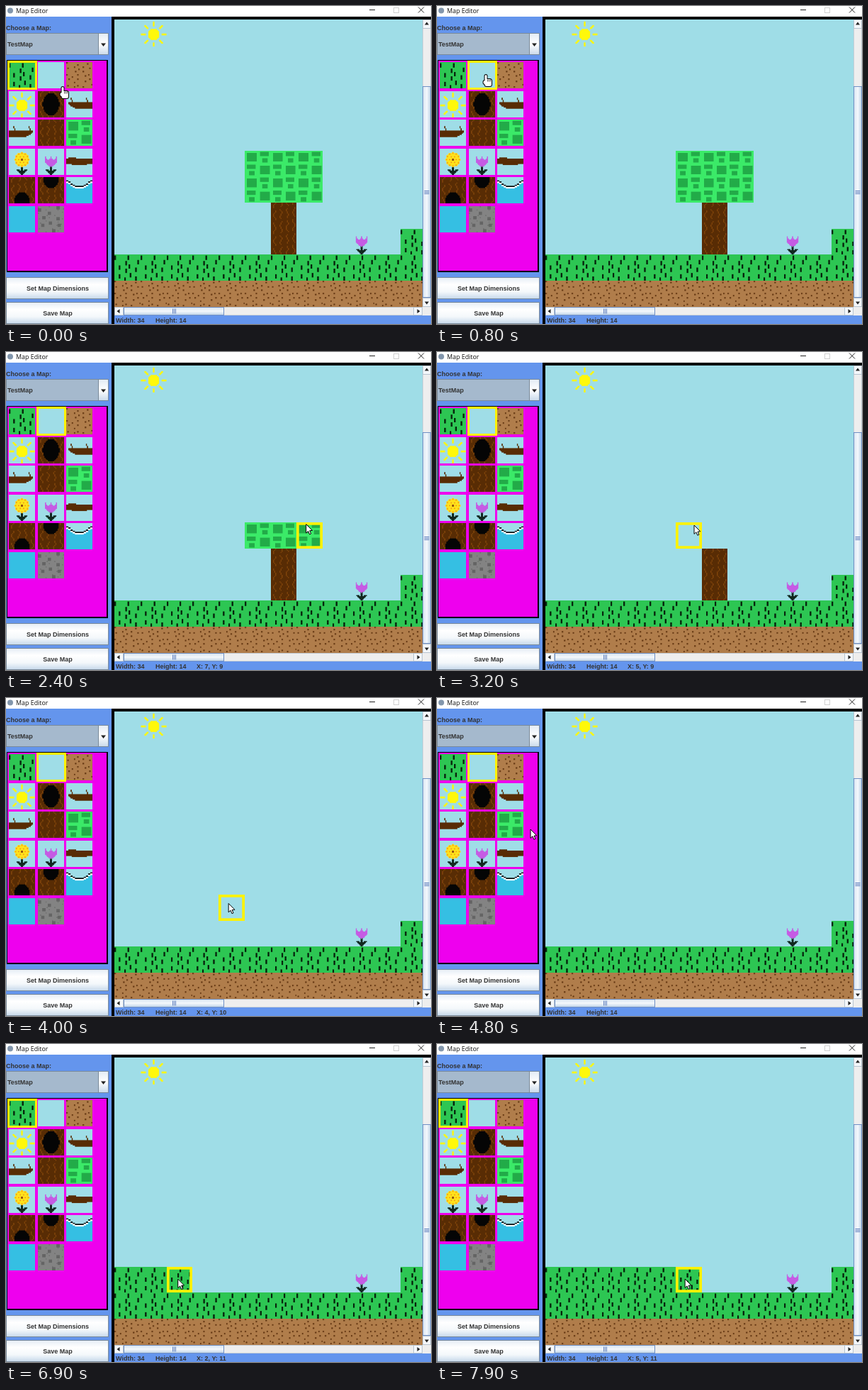
Write an HTML page with a canvas that moves like this. It is 600 px wide and 448 px high and loops after 8000 ms.

```html
<!DOCTYPE html>
<html lang="en">
<head>
<meta charset="utf-8">
<title>Map Editor</title>
<style>
  html, body { margin: 0; width: 100%; height: 100%; overflow: hidden; background: #6495ed; }
  canvas { display: block; width: 600px; height: 448px; }
</style>
</head>
<body>
<canvas id="stage" width="600" height="448"></canvas>
<script>
const ctx = document.getElementById('stage').getContext('2d');
const LOOP = 8000, STEP = 100;
const CELL = 36.7, MAP_X = 153.8, MAP_Y = -89.5;
const VIEW = { x: 153, y: 19, w: 435, h: 405 };
const SKY = '#9fdde7', BLUE = '#6495ed', YELLOW = '#fff200', EDGE = '#7a8a99';
const BARK = '#582c04', WATER = '#35bfe3', BLACK = '#050505', STEM = '#10281f';
const UI_BOLD = 'bold 9px "Liberation Sans", Arial, sans-serif';

// ---------- Tiles, drawn on a 24 x 24 grid ----------
function makeTile(base, paint) {
  const c = document.createElement('canvas');
  c.width = c.height = 48;
  const g = c.getContext('2d');
  g.scale(2, 2);
  const put = (color, x, y, w = 1, h = 1) => {
    g.fillStyle = color;
    g.fillRect(x, y, w, h);
  };
  put(base, 0, 0, 24, 24);
  if (paint) paint(put);
  return c;
}

function disc(put, color, cx, cy, rx, ry = rx) {
  for (let y = 0; y < 24; y++) {
    const k = 1 - ((y + .5 - cy) / ry) ** 2;
    if (k <= 0) continue;
    const half = Math.round(rx * Math.sqrt(k));
    put(color, cx - half, y, half * 2, 1);
  }
}

function ring(put, color, cx, cy, radius, count, size = 1) {
  for (let i = 0; i < count; i++) {
    const a = i / count * Math.PI * 2;
    put(color, cx + Math.cos(a) * radius - size / 2, cy + Math.sin(a) * radius - size / 2, size, size);
  }
}

function seeded(seed) {
  return () => (seed = (seed * 16807) % 2147483647) / 2147483647;
}

// One speck in each square of a grid, shifted at random; odd columns sit lower.
function specks(put, color, cols, rows, w, h, seed) {
  const rnd = seeded(seed), gx = 24 / cols, gy = 24 / rows;
  for (let c = 0; c < cols; c++) {
    for (let r = 0; r < rows; r++) {
      const x = c * gx + rnd() * (gx - w);
      const y = (r + c % 2 / 2) * gy + rnd() * (gy - h) / 2;
      put(color, Math.round(x), Math.round(y), w, h);
    }
  }
}

function bark(put) {
  for (let x = 3; x < 24; x += 6) {
    for (let y = 0; y < 24; y++) {
      if ((y + x * 2) % 11 > 1) put('#7e430a', x + Math.round(Math.sin((y + x) * .8)), y);
    }
  }
}

const hollow = (cy, rx = 7.2) => makeTile(BARK, put => {
  bark(put);
  disc(put, BLACK, 12, cy, rx, 10.5);
});

// A tapering bough that leaves one side of the tile, with two twigs.
const branch = (top, fromLeft) => makeTile(SKY, put => {
  for (let i = 0; i < 6; i++) {
    const gap = 2 + Math.round(i * i * .25);
    put(BARK, fromLeft ? 0 : gap, top + i, 24 - gap, 1);
  }
  for (const x of [4, 18]) {
    for (let i = 0; i < 4; i++) put(BARK, x + (i >> 1), top - 4 + i);
  }
});

function stem(put) {
  put(STEM, 11, 16, 2, 8);
  for (let i = 0; i < 4; i++) {
    put(STEM, 7 + i, 19 + i, 3, 1);
    put(STEM, 14 - i, 19 + i, 3, 1);
  }
}

const tiles = {
  grass: makeTile('#2dc653', put => specks(put, '#06240c', 4, 3, 1.5, 4, 41)),
  sky: makeTile(SKY),
  dirt: makeTile('#b07d4b', put => specks(put, '#633611', 5, 5, 1.3, 1.3, 77)),
  sun: makeTile(SKY, put => {
    disc(put, '#fff80a', 12, 13, 5.4);
    for (let r = 8; r <= 11; r++) ring(put, '#fff80a', 12, 13, r, 8, 1.5);
  }),
  hole: hollow(12, 7.6),
  branchR: branch(10, false),
  branchL: branch(10, true),
  trunk: makeTile(BARK, bark),
  leaf: makeTile('#3bea68', put => {
    for (let q = 0; q < 4; q++) {
      const x = q % 2 * 12, y = (q >> 1) * 12;
      if (q % 3 === 0) put('#22ab48', x + 2, y + 2, 9, 8);
      else {
        put('#22ab48', x + 2, y + 1, 8, 4);
        put('#22ab48', x + 4, y + 7, 5, 4);
      }
    }
  }),
  daisy: makeTile(SKY, put => {
    stem(put);
    disc(put, '#ffe21a', 12, 10, 6.6);
    ring(put, '#f08a1c', 12, 10, 5.8, 12);
    ring(put, '#f08a1c', 12, 10, 3, 6);
    put('#9a5a10', 11, 9, 2, 2);
  }),
  tulip: makeTile(SKY, put => {
    stem(put);
    for (let x = -5; x <= 5; x++) {
      const d = Math.abs(x), top = Math.round(7 + 1.6 * Math.min(d, 5 - d));
      put('#c55be4', 11.5 + x, top, 1, Math.round(16.5 - d * d * .16) - top);
    }
  }),
  log: makeTile(SKY, put => {
    put(BARK, 0, 9, 24, 5);
    put(BARK, 2, 8, 7, 1);
    put(BARK, 5, 14, 14, 1);
  }),
  holeTop: hollow(24),
  holeBottom: hollow(0),
  shore: makeTile(SKY, put => {
    for (let x = 0; x < 24; x += 2) {
      const y = Math.round(2 + 6 * Math.sin(Math.PI * (x + 1) / 24));
      put(WATER, x, y, 2, 24 - y);
      put('#fff', x, y, 2, 2.5);
      put(BLACK, x, y, 2, 1);
    }
  }),
  water: makeTile(WATER),
  stone: makeTile('#838383', put => {
    specks(put, '#707070', 5, 5, 1, 1, 12);
    specks(put, '#646464', 3, 3, 3, 3, 5);
  })
};
const palette = Object.keys(tiles);

// ---------- Timeline ----------
const picks = [[0, 0], [500, 1], [5400, 0]];

// Painted cells: back and forth over the crown, down the trunk, then along the ground.
const strokes = [];
for (let i = 0; i < 8; i++) {
  const c = i > 5 ? 6 : 5 + Math.min(i, 5 - i, 2) + (i === 3 ? 0 : 0);
  const r = i > 5 ? i + 4 : i > 2 ? 9 : 8;
  strokes.push({ t: 1650 + 290 * i, c, r, tile: 'sky' });
}
for (let c = 0; c < 6; c++) strokes.push({ t: 6300 + 290 * c, c, r: 11, tile: 'grass' });

// Pointer stops outside the strokes; during strokes it visits each painted cell.
const stops = [
  [0, 80, 114], [600, 69, 97], [900, 69, 97], [1600, 344, 216], [3200, 363, 244],
  [4800, 132, 185], [5300, 24, 100], [5500, 24, 100], [6000, 217, 318], [LOOP, 350, 331]
];
const path = strokes
  .map(s => [s.t, MAP_X + s.c * CELL + 13, MAP_Y + s.r * CELL + 17])
  .concat(stops)
  .sort((a, b) => a[0] - b[0]);

function pointerAt(t) {
  const i = path.findIndex(p => p[0] > t);
  const [t0, x0, y0] = path[i - 1], [t1, x1, y1] = path[i];
  const k = (t - t0) / (t1 - t0);
  return { x: x0 + (x1 - x0) * k, y: y0 + (y1 - y0) * k };
}

function mapAt(t) {
  const map = { '1,3': 'sun', '9,11': 'tulip', '11,11': 'grass', '6,10': 'trunk', '6,11': 'trunk' };
  for (let c = 0; c < 12; c++) { map[c + ',12'] = 'grass'; map[c + ',13'] = 'dirt'; }
  for (let c = 5; c < 8; c++) map[c + ',8'] = map[c + ',9'] = 'leaf';
  for (const s of strokes) if (s.t <= t) map[s.c + ',' + s.r] = s.tile;
  return map;
}

function cellAt({ x, y }) {
  const inside = x >= VIEW.x && x < VIEW.x + VIEW.w && y >= VIEW.y && y < VIEW.y + VIEW.h;
  return inside && { c: Math.max(0, Math.floor((x - MAP_X) / CELL)), r: Math.floor((y - MAP_Y) / CELL) };
}

function cellBox(c, r) {
  const x = Math.floor(MAP_X + c * CELL), y = Math.floor(MAP_Y + r * CELL);
  return [x, y, Math.floor(MAP_X + (c + 1) * CELL) - x, Math.floor(MAP_Y + (r + 1) * CELL) - y];
}

// ---------- Drawing helpers ----------
function box(color, x, y, w, h) {
  ctx.fillStyle = color;
  ctx.fillRect(x, y, w, h);
}

function frame(color, x, y, w, h, line = 1) {
  ctx.strokeStyle = color;
  ctx.lineWidth = line;
  ctx.strokeRect(x + line / 2, y + line / 2, w - line, h - line);
}

function text(str, x, y, font = UI_BOLD, color = '#333', align = 'left') {
  ctx.font = font;
  ctx.fillStyle = color;
  ctx.textAlign = align;
  ctx.fillText(str, x, y);
}

function shape(points, fill) {
  ctx.beginPath();
  points.forEach(([x, y]) => ctx.lineTo(x, y));
  ctx.closePath();
  ctx.fillStyle = fill;
  ctx.fill();
}

function glossy(x, y, w, h, sideways, stops) {
  const g = ctx.createLinearGradient(x, y, sideways ? x + w : x, sideways ? y : y + h);
  stops.forEach((s, i) => g.addColorStop(i / (stops.length - 1), s));
  box(g, x, y, w, h);
}

function button(label, y, h) {
  glossy(0, y, 145, h, false, ['#e4ecf5', '#fff', '#f4f8fb', '#c4d7ea']);
  frame(EDGE, 0, y, 145, h);
  text(label, 73, y + h / 2 + 3.5, UI_BOLD, '#333', 'center');
}

function arrow(x, y, dx, dy, s = 3) {
  shape([[x + dx * s, y + dy * s], [x - dy * s - dx, y + dx * s - dy], [x + dy * s - dx, y - dx * s - dy]], '#222');
}

// ---------- Window parts ----------
function drawTitle() {
  box('#fff', 0, 0, 600, 15);
  ctx.fillStyle = '#8296ac';
  ctx.beginPath();
  ctx.arc(6, 6.5, 4, 0, 7);
  ctx.fill();
  text('Map Editor', 14, 9.5, '8.9px "Open Sans", "Noto Sans", sans-serif', '#111');
  box('#222', 513, 5, 8, 1);
  frame('#d0d0d0', 547, 2, 8, 8);
  ctx.strokeStyle = '#222';
  ctx.lineWidth = 1;
  ctx.beginPath();
  ctx.moveTo(582, 1.5); ctx.lineTo(590, 9.5);
  ctx.moveTo(590, 1.5); ctx.lineTo(582, 9.5);
  ctx.stroke();
}

function drawSide(selected) {
  box(BLUE, 0, 15, 149, 433);
  text('Choose a Map:', 0, 34);
  box('#a5b9cd', 0, 38, 145, 31);
  frame(EDGE, 0, 38, 145, 31);
  text('TestMap', 2, 57);
  glossy(130, 39, 14, 29, false, ['#e4ecf5', '#fff', '#cbdbeb']);
  frame(EDGE, 130, 38, 15, 31);
  arrow(137.5, 53.5, 0, 1, 3.5);

  box('#000', 1, 76, 143, 299);
  box('#ee00ee', 2, 77, 140, 296);
  palette.forEach((name, i) => {
    const x = Math.round(4.4 + i % 3 * 40.5), y = Math.round(79.3 + Math.floor(i / 3) * 40.5);
    ctx.drawImage(tiles[name], x, y, 37, 37);
    if (i === selected) frame(YELLOW, x - 2, y - 2, 42, 41, 3);
  });

  button('Set Map Dimensions', 382, 31);
  button('Save Map', 417, 31);
}

function scrollbar(x, y, length, from, size, upright) {
  const part = (at, len) => upright ? [x, y + at, 12, len] : [x + at, y, len, 12];
  const dx = upright ? 0 : 1, dy = upright ? 1 : 0;
  box('#eee', ...part(0, length));
  frame('#c3ccd5', ...part(0, length));
  for (const side of [-1, 1]) {
    const [bx, by, w, h] = part(side < 0 ? 0 : length - 13, 13);
    box('#f4f7fa', bx, by, w, h);
    frame('#b8c4d0', bx, by, w, h);
    arrow(bx + w / 2, by + h / 2, dx * side, dy * side);
  }
  glossy(...part(from, size), upright, ['#d3e1ef', '#f4f8fc', '#b8cfe5']);
  frame('#6f8fc4', ...part(from, size));
  for (let i = -1; i < 2; i++) {
    const [gx, gy, w, h] = part(from + size / 2 + i * 2, 1);
    box('#6382bf', gx + 2.5 * dy, gy + 2.5 * dx, w - 5 * dy, h - 5 * dx);
  }
}

function drawMap(map, cell) {
  box('#000', 149, 15, 451, 433);
  box(SKY, VIEW.x, VIEW.y, VIEW.w, VIEW.h);
  ctx.save();
  ctx.beginPath();
  ctx.rect(VIEW.x, VIEW.y, VIEW.w, VIEW.h);
  ctx.clip();
  for (const key in map) {
    if (map[key] !== 'sky') ctx.drawImage(tiles[map[key]], ...cellBox(...key.split(',').map(Number)));
  }
  if (cell) frame(YELLOW, ...cellBox(cell.c, cell.r), 3.7);
  ctx.restore();

  box('#eee', 588, 424, 12, 12);
  scrollbar(588, 19, 405, 94, 298, true);
  scrollbar(153, 424, 435, 13, 142, false);
  box(BLUE, 153, 436, 447, 12);
  text('Width: 34', 155, 446);
  text('Height: 14', 211, 446);
  if (cell) text(`X: ${cell.c}, Y: ${cell.r}`, 269, 446);
}

function overTile({ x, y }) {
  const c = (x - 3) / 40.5, r = (y - 78) / 40.5;
  return c >= 0 && c < 3 && r >= 0 && r < 6 && Math.floor(r) * 3 + Math.floor(c) < palette.length;
}

function drawHand() {
  ctx.beginPath();
  ctx.roundRect(-1.5, 0, 3, 11, 1.5);
  ctx.roundRect(-3.5, 8, 5, 5, 2);
  ctx.roundRect(-1.5, 6, 9.5, 10, 2.5);
  ctx.stroke();
  ctx.fill();
  for (let x = 2; x < 7; x += 2) box('#000', x, 6.5, .7, 3);
}

function drawArrow() {
  ctx.beginPath();
  for (const [x, y] of [[0, 0], [0, 12.4], [2.9, 9.8], [4.9, 14.3], [6.9, 13.4], [5, 9.1], [8.8, 8.8]]) {
    ctx.lineTo(x, y);
  }
  ctx.closePath();
  ctx.fill();
  ctx.stroke();
}

function drawPointer(p) {
  ctx.save();
  ctx.translate(p.x, p.y);
  ctx.lineJoin = 'round';
  ctx.fillStyle = '#fff';
  ctx.strokeStyle = '#000';
  ctx.lineWidth = overTile(p) ? 2 : 1;
  (overTile(p) ? drawHand : drawArrow)();
  ctx.restore();
}

function draw(t) {
  const pointer = pointerAt(t);
  const selected = picks.filter(p => p[0] <= t).pop()[1];
  drawTitle();
  drawSide(selected);
  drawMap(mapAt(t), cellAt(pointer));
  drawPointer(pointer);
}

const start = performance.now();
function tick() {
  const t = (performance.now() - start) % LOOP;
  draw(Math.floor(t / STEP) * STEP);
  requestAnimationFrame(tick);
}
tick();
</script>
</body>
</html>
```
